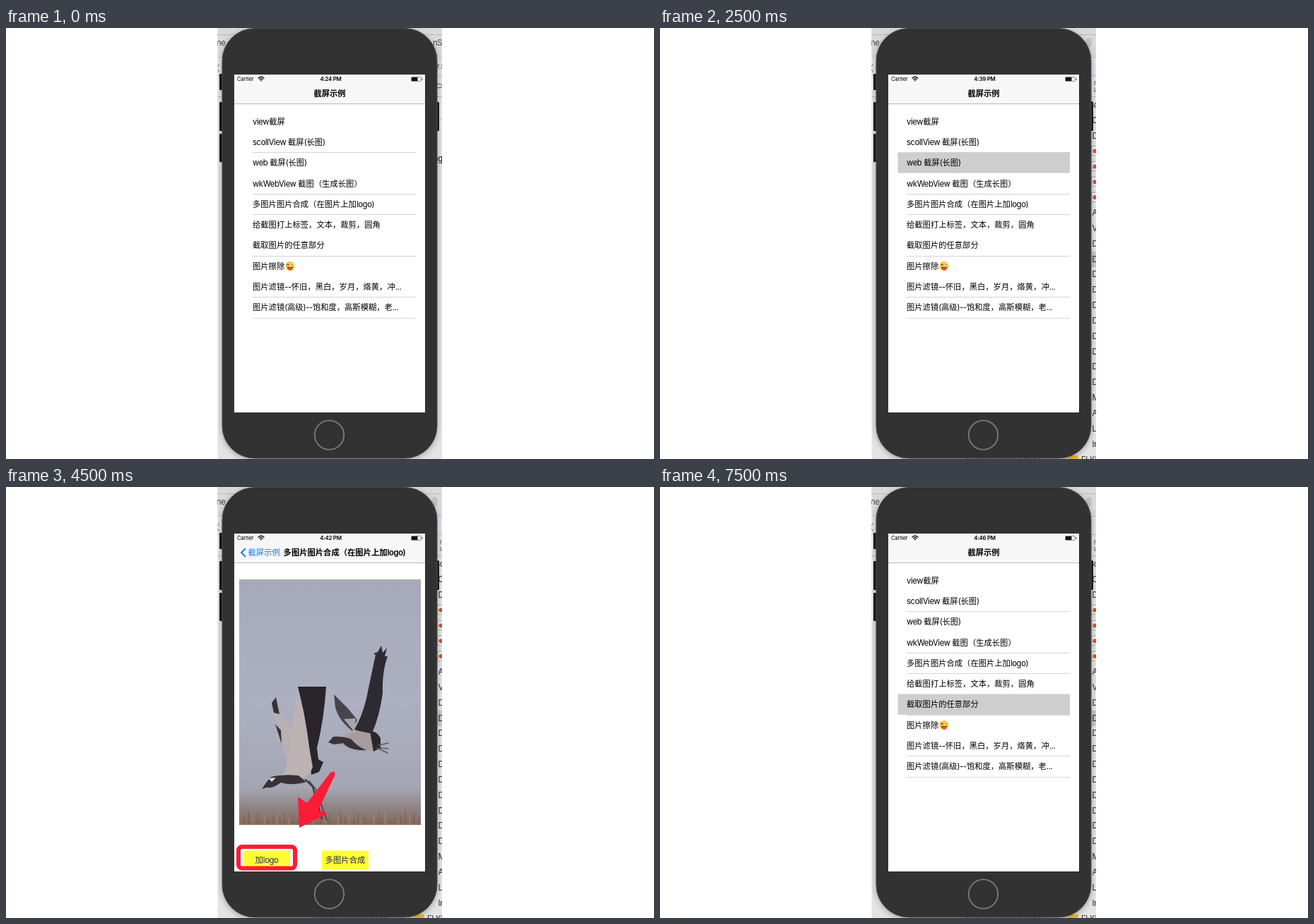
Recreate the animation shown at these times as an HTML page. Size 917 by 611 pixels, loop 8 s.

```html
<!DOCTYPE html>
<html lang="zh-CN">
<head>
<meta charset="utf-8">
<title>截屏示例</title>
<style>
html, body { margin: 0; width: 100%; height: 100%; overflow: hidden; background: #fff; }
svg { display: block; width: 100vw; height: 100vh; font: 11.3px Inter, "Noto Sans CJK SC", "Noto Sans CJK", sans-serif; }
tspan { letter-spacing: -.035em; }
.b { font-weight: 600; }
.m { text-anchor: middle; }
</style>
</head>
<body>
<svg viewBox="0 0 917 611">
  <defs>
    <clipPath id="strip"><rect x="299.5" width="317.5" height="611"/></clipPath>
    <clipPath id="screenClip"><rect x="323" y="66" width="270" height="479"/></clipPath>
    <clipPath id="photoClip"><rect x="330" y="131" width="257" height="348"/></clipPath>
    <filter id="shadow" x="-10%" y="-10%" width="120%" height="120%">
      <feDropShadow dx="0" dy="2" stdDeviation="4" flood-opacity=".3"/>
    </filter>
    <linearGradient id="dusk" x2=".15" y2="1">
      <stop offset="0" stop-color="#8997b5"/><stop offset=".35" stop-color="#c9a3ae"/>
      <stop offset=".65" stop-color="#dba7a2"/><stop offset="1" stop-color="#8d8da3"/>
    </linearGradient>
    <linearGradient id="water" x2="0" y2="1">
      <stop offset="0" stop-color="#777d91"/><stop offset=".5" stop-color="#555a70"/><stop offset="1" stop-color="#2b2d43"/>
    </linearGradient>
    <linearGradient id="sunset" x2=".8" y2="1">
      <stop offset="0" stop-color="#6d7690"/><stop offset=".45" stop-color="#8a7f8c"/>
      <stop offset=".75" stop-color="#e28a5c"/><stop offset="1" stop-color="#b06a5c"/>
    </linearGradient>
    <linearGradient id="field" x2="0" y2="1">
      <stop offset="0" stop-color="#a5a9ba"/><stop offset=".5" stop-color="#adb0c1"/><stop offset=".85" stop-color="#a5a6b3"/>
      <stop offset=".92" stop-color="#91888a"/><stop offset="1" stop-color="#85695c"/>
    </linearGradient>
  </defs>
  <g clip-path="url(#strip)">
    <g id="desk"></g>
    <g fill="#1c1c1c">
      <rect x="302" y="65" width="6" height="23" rx="1"/>
      <rect x="302" y="105" width="6" height="41" rx="1"/>
      <rect x="302" y="150" width="6" height="40" rx="1"/>
      <rect x="608" y="105" width="5" height="41" rx="1"/>
    </g>
    <rect x="306" y=".5" width="304" height="609.5" rx="46" fill="#333" stroke="#4a4a4a" filter="url(#shadow)"/>
    <circle cx="457.5" cy="577" r="20.7" fill="none" stroke="#7b7b7b" stroke-width="1.8"/>
    <g id="screen" clip-path="url(#screenClip)"></g>
  </g>
</svg>
<script>
const rect = (x, y, w, h, fill, more = '') =>
  `<rect x="${x}" y="${y}" width="${w}" height="${h}" fill="${fill}" ${more}/>`;
const path = (d, fill, more = '') => `<path d="${d}" fill="${fill}" ${more}/>`;
const line = (d, color, width = 1) =>
  path(d, 'none', `stroke="${color}" stroke-width="${width}" stroke-linecap="round"`);
// Latin runs get tighter tracking than the Chinese ones
const text = (x, y, s, more = '') =>
  `<text x="${x}" y="${y}" ${more}>${s.replace(/[ -~]+/g, '<tspan>$&</tspan>')}</text>`;

const rows = ['view截屏', 'scollView 截屏(长图)', 'web 截屏(长图)', 'wkWebView 截图（生成长图）',
  '多图片图片合成（在图片上加logo)', '给截图打上标签，文本，裁剪，圆角', '截取图片的任意部分', '图片擦除',
  '图片滤镜--怀旧，黑白，岁月，烙黄，冲...', '图片滤镜(高级)--饱和度，高斯模糊，老...'];
const pitch = 29.3;

function desk(late) {
  const grey = 'fill="#444"';
  let out = rect(299, 0, 318, 611, '#e4e4e4') + rect(299, 0, 318, 40, '#dadada');
  for (const y of [9, 41, 67, 97]) out += rect(299, y, 318, 1, '#b8b8b8');
  out += text(298, 25, 'ne', grey) + line('M301 52 L298 57 L301 62', '#555');
  if (!late) {
    return out + rect(605, 129, 12, 1, '#bbb') + text(604, 25, 'nS', grey) + text(607, 58, 'y.s', grey) +
      line('M608 82 Q613 76 618 82 Q613 88 608 82', '#444') + text(605, 189, 'ng');
  }
  out += rect(603, 14, 8, 13, '#c4c4c4', 'rx="4"') + rect(608, 42, 9, 25, '#e3e2ee') +
    line('M618 76 H615 V81 M618 90 H615 V85', '#666') + rect(608, 317, 9, 22, '#c9c9c9');
  const marks = 'SCD    AVDDDDDDDDDDMALI';
  [...marks].forEach((c, i) => {
    const y = 109 + i * 21.85;
    out += c === ' ' ? rect(611, y - 7, 8, 13, '#f4f4f4', 'stroke="#aaa"') + `<circle cx="615.5" cy="${y}" r="3" fill="#f0442c"/>`
      : text(c === 'S' ? 607 : 611.5, y + 4, c === 'S' ? 'So' : c === 'I' ? 'In' : c, 'fill="#222"');
  });
  return out + text(432, 617, 'aCounDeMarBoaKno', 'class="b" fill="#a02a90"') +
    rect(576, 606, 16, 6, '#f0bd35', 'rx="1"') + text(596, 615.5, 'FLKM', 'fill="#333"');
}

function bars(time) {
  return rect(323, 66, 270, 479, '#fff') + rect(323, 66, 270, 41, '#f7f7f7') + rect(323, 107, 270, 1, '#b9b9b9') +
    text(327, 75.2, 'Carrier', 'font-size="7.7"') +
    line('M357 71 Q361 67.4 365 71', '#111', 1.4) + line('M358.8 73 Q361 71 363.2 73', '#111', 1.4) + path('M359.8 74.2 Q361 73.2 362.2 74.2 L361 75.8 Z', '#111') +
    text(459.5, 75.2, time + ' PM', 'class="b m" font-size="7.9"') +
    rect(573.5, 69.5, 14, 6, 'none', 'rx="1.3" stroke="#777" stroke-width=".8"') + rect(574, 70, 8.5, 5, '#111') + rect(588.5, 71, 1.2, 3, '#777');
}

function list(time, picked) {
  let out = bars(time) + text(458, 97, '截屏示例', 'class="b m"');
  for (const i of [1, 3, 4, 6, 8, 9]) out += rect(349, Math.round(147 + i * pitch), 231, 1, '#d3d3d3');
  if (picked !== undefined) out += rect(336.5, 117.7 + picked * pitch, 243.5, pitch, '#cecece');
  rows.forEach((s, i) => out += text(349, 136.6 + i * pitch, s));
  return out + '<circle cx="402" cy="337.5" r="6.6" fill="#f8c63c"/>' +
    '<circle cx="404.8" cy="335.3" r="1.7" fill="#fff"/><circle cx="404.8" cy="335.3" r=".9" fill="#4b3016"/>' +
    line('M397.6 335 L400.3 336', '#4b3016', 1.1) + path('M398 338.5 Q402 340 406 338.5 Q405 343 402 343 Q399 343 398 338.5', '#63340f') +
    path('M400 340 H404.3 V342.5 Q402 345.5 400 342.5 Z', '#ef4d5f');
}

function page(time, title, center, body) {
  return bars(time) + path('M339 87 L333 93 L339 99', 'none', 'stroke="#1479f2" stroke-width="1.9"') +
    text(342.5, 97, '截屏示例', 'fill="#1479f2"') + text(center, 97, title, 'class="b m"') + body;
}

const button = (x, w, label) => rect(x, 515.5, w, 26.5, '#ffff35') +
  text(x + w / 2, 532.5, label, 'class="m" fill="#252560"');
const frame = (x, y, w, h, color) => rect(x, y, w, h, 'none', `rx="5" stroke="${color}" stroke-width="6"`);

function skyline() {
  const towers = [[356, 194, 8], [367, 203, 9], [380, 191, 10], [394, 203, 12], [407, 187, 11], [420, 200, 9],
    [432, 206, 30], [463, 197, 17], [488, 168, 13], [505, 193, 8], [515, 208, 22], [538, 180, 14], [553, 195, 7]];
  let out = rect(336.5, 131, 237.5, 85, 'url(#dusk)') +
    path('M337 142 Q420 128 480 150 Q530 140 574 133 V158 Q520 150 470 172 Q400 150 337 165 Z', '#d9929c', 'opacity=".5"') +
    path('M337 131 H430 Q395 146 337 148 Z M500 160 Q540 150 574 163 V176 Q530 165 500 170 Z', '#7d8dae', 'opacity=".6"') +
    path('M336.5 211 Q440 203 574 211 V217 H336.5 Z', '#3d4359');
  for (const [x, y, w] of towers) out += path(`M${x} 214 V${y + 2} L${x + w} ${y} V214 Z`, '#444d68');
  out += rect(336.5, 215, 237.5, 78.5, 'url(#water)') + rect(488, 216, 14, 45, '#343950', 'opacity=".45"');
  for (let i = 0; i < 55; i++) {
    const x = 340 + i * 83 % 222, y = 220 + i * 37 % 71;
    out += rect(x, y, 5 + i % 5, 1, i % 2 ? '#8e8c9f' : '#282c43', 'opacity=".4"');
  }
  return out + '<circle cx="338" cy="215" r="2.5" fill="#1c2033"/>';
}

function temple() {
  let out = rect(336.5, 297.5, 116.5, 96.5, '#f4f2f4') +
    path('M336.5 328 Q345 333 360 332 H432 Q443 331 449 321 L452 325 Q446 338 437 341 H336.5 Z', '#626871') +
    rect(344, 341, 91, 18, '#713a3a') + rect(376, 344, 26, 11, '#a9512f') +
    path('M336.5 351 Q350 358 370 357 H420 Q440 355 448 346 L452 351 Q446 362 436 366 H336.5 Z', '#545962') +
    rect(336.5, 365, 116.5, 7, '#d9d3d1') + rect(336.5, 372, 116.5, 6, '#a49b99') +
    rect(336.5, 378, 116.5, 16, '#70282f') + rect(379, 385, 24, 9, '#b57b3a');
  for (let x = 340; x < 453; x += 9) out += rect(x, 364, 2, 14, '#f1eded') + rect(x, 380, 2, 14, '#4d3039');
  for (let x = 346; x < 434; x += 7) out += rect(x, 341, 2, 18, '#44474f');
  return out;
}

const bay = () => rect(456, 297.5, 118, 96.5, 'url(#sunset)') +
  path('M470 297 H574 V320 Q535 305 500 330 Q485 320 470 297', '#747a91', 'opacity=".7"') +
  path('M574 323 Q548 330 515 352 Q545 342 574 342 Z', '#f1a44f', 'opacity=".75"') +
  path('M456 373 H574 V394 H456 Z', '#786c78') +
  path('M456 362 Q466 350 486 351 Q495 358 508 357 Q525 361 547 372 L574 362 V388 Q558 389 548 378 L515 374 Q490 378 480 390 L456 393 Z', '#252936');

function scroller(callout) {
  let out = rect(330, 131, 257, 348, '#fb0613') + rect(336.5, 131, 243.5, 263, '#fff') +
    skyline() + temple() + bay() + rect(336.5, 435, 243.5, 44, '#a5a7b8') +
    button(335.5, 99, '截ScrollImage') + button(447, 99, '清除');
  if (callout) out += frame(331, 514, 114, 28, '#2098cd') +
    path('M457 508 L467 487 L471 492 L503 475.5 Q506 475 505.5 478 L476 499 L480 505 Z', '#2098cd');
  return out;
}

function cranes(logo) {
  let out = rect(330, 131, 257, 348, 'url(#field)');
  for (let i = 0; i < 45; i++) {
    const x = 332 + i * 5.7, h = 5 + i * 7 % 16;
    out += line(`M${x} 479 l${i % 5 - 2} ${-h}`, i % 3 ? '#74594b' : '#b49579', .8);
  }
  // near bird
  out += path('M382 298 L388 322 Q405 338 410 352 L402 392 Q390 372 388 350 L384 362 L382 340 L379 320 L376 306 Z', '#b8b0b3') +
    path('M382 298 L387 322 L379 320 L376 306 Z M381 336 L389 345 L390 364 Z', '#353238') +
    path('M413 283 H453 Q450 330 440 370 L442 386 L449 390 L443 404 L432 408 Q430 350 413 283', '#29252b') +
    path('M411 300 Q420 300 424 340 L434 397 Q428 415 402 416 L384 421 L383 414 L395 403 Q402 370 411 300', '#bcb2b2') +
    path('M362 428 L369 418 L375 411 Q392 407 414 409 L425 418 Q405 424 389 419 Q377 428 369 426 Z', '#37323a') +
    path('M372 413 L382 412 L376 418 Z', '#ddd') +
    line('M424 415 L434 425 L447 470', '#3b353a', 2.2) + line('M429 417 L438 428 L454 472', '#4f484c', 1.8);
  // far bird
  out += path('M464 294 L484 314 L497 330 L490 346 Q470 330 466 312 Z', '#47444d') +
    path('M478 329 L495 328 L493 347 Z', '#aaa3a8') +
    path('M531 225 L533 235 L539 228 L536 240 L540 240 Q532 262 533 292 Q529 325 517 351 L493 344 Q507 320 513 285 L523 238 L520 236 L526 234 Z', '#2e2a31') +
    path('M470 359 Q487 346 500 346 L520 350 L527 367 Q510 379 495 373 Q480 367 470 365 Z', '#a79ca0') +
    path('M456 362 L463 354 Q475 353 488 357 Q497 368 510 373 Q486 374 477 363 L464 365 Z', '#38333a') +
    path('M515 346 Q524 345 530 356 L530 370 L520 375 Z', '#2b272c') +
    line('M527 366 L541 363 M525 370 L540 377 M530 370 L541 371', '#62575a', 1.6);
  if (logo) out += rect(366, 176, 89, 107, '#e1d3e7') + rect(384, 192, 51, 71.5, '#fff') + rect(389, 207, 41, 41, '#24181c');
  return `<g clip-path="url(#photoClip)">${out}</g>`;
}

const redArrow = dx => path('M526 483 L524 439 L537 448 L570 405 Q575 401 577 407 L553 458 L566 463 Z', '#fc1c38', `transform="translate(${dx})"`);

// mark: 0 none, 1 left button, 2 right button
function merge(logo, mark) {
  const body = cranes(logo) + button(336, 66, '加logo') + button(447, 66, '多图片合成') +
    (mark ? frame(mark === 1 ? 329 : 440, 510, 80, 30.5, '#fc1c38') + redArrow(mark === 1 ? -111 : 0) : '');
  return page('4:42', rows[4], 479, body);
}

const twoButtons = label => button(335.5, 99, label) + button(447, 99, '清除');
const scroll = mark => page('4:36', rows[1], 458, scroller(mark));

// one scene per half second
const scenes = [
  list('4:24'),
  page('4:24', rows[0], 458, cranes() + twoButtons('截图')),
  list('4:36', 1),
  scroll(true),
  scroll(false),
  list('4:39', 2),
  page('4:39', rows[2], 458, twoButtons('截图')),
  list('4:41', 3),
  list('4:43', 4),
  merge(false, 1),
  merge(true, 0),
  merge(true, 2),
  merge(true, 0),
  list('4:45', 5),
  page('4:45', rows[5], 484, cranes()),
  list('4:46', 6),
];
const desks = [desk(false), desk(true)];
const screenEl = document.getElementById('screen');
const deskEl = document.getElementById('desk');
let shown = -1;

function tick() {
  const now = Math.floor(performance.now() % 8000 / 500);
  if (now !== shown) {
    shown = now;
    screenEl.innerHTML = scenes[now];
    deskEl.innerHTML = desks[now < 2 ? 0 : 1];
  }
  requestAnimationFrame(tick);
}
tick();
</script>
</body>
</html>
```
